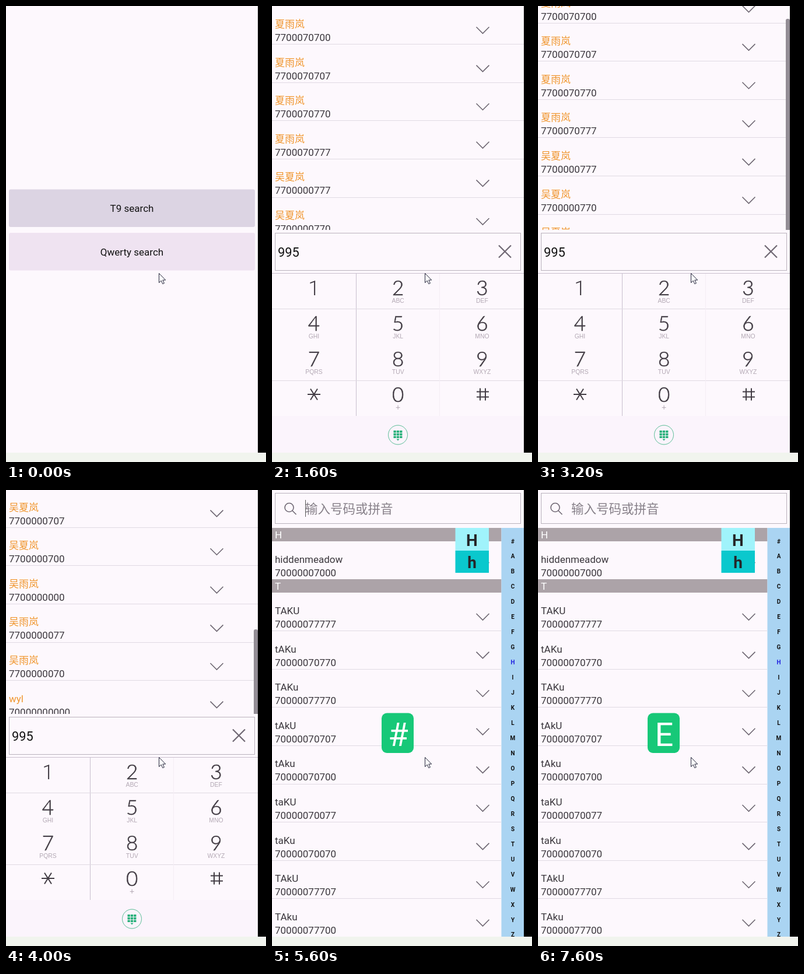
An HTML page for the animation above (8000 ms loop, 446 px wide and 782 px high).

```html
<!DOCTYPE html>
<html lang="zh-CN">
<head>
<meta charset="utf-8">
<title>Contact search</title>
<style>
html, body { margin: 0; width: 100%; height: 100%; overflow: hidden; background: #fdf8fd; }
svg { display: block; width: 446px; height: 782px; }
text { font-family: Roboto, "Noto Sans CJK SC", "Noto Sans CJK", sans-serif; font-size: 17px; fill: #3a363c; }
.mid { text-anchor: middle; }
.line { stroke: #e0dae3; fill: none; }
.icon { stroke: #6e6672; fill: none; stroke-width: 1.6; }
.hot { fill: #f0962e; }
.box { fill: #fdf8fd; stroke: #b9b2bc; }
.query { font-size: 21.8px; fill: #111; }
.digit { font: 300 35px Lato, sans-serif; fill: #423c44; stroke: #423c44; stroke-width: .6; }
.one { font-family: Roboto, sans-serif; stroke: none; }
.label { font: 10.4px "Liberation Sans", Arial, sans-serif; fill: #b3a8b4; }
.plus { font-size: 14px; }
.head { fill: #fff; }
.index { font-size: 10px; font-weight: 700; fill: #111; }
.tile { font-size: 28px; font-weight: 700; fill: #252528; }
.pop { font-size: 56px; fill: #fff; }
</style>
</head>
<body>
<svg viewBox="0 0 446 782">
  <defs>
    <clipPath id="top"><rect width="432" height="384"/></clipPath>
    <clipPath id="screen"><rect width="432" height="766"/></clipPath>
  </defs>
  <rect width="446" height="782" fill="#fdf8fd"/>
  <g id="menu">
    <rect id="btn0" x="5" y="314.5" width="422" height="64.5" rx="3"/>
    <rect id="btn1" x="5" y="389" width="422" height="64.5" rx="3"/>
    <text class="mid" x="216" y="353" style="fill:#111">T9 search</text>
    <text class="mid" x="216" y="427.5" style="fill:#111">Qwerty search</text>
  </g>
  <g id="dial">
    <g clip-path="url(#top)">
      <g id="list"></g>
      <rect id="thumb" x="425" width="7" height="400" rx="3" fill="#938d95"/>
    </g>
    <rect class="box" x="5.5" y="389.5" width="421" height="64"/>
    <text id="query" class="query" x="10" y="429.5"></text>
    <path id="erase" class="icon" style="stroke-width:2.2" d="M389 410.5l21 21m0-21l-21 21"/>
    <rect y="703" width="432" height="63" fill="#fbf4fc"/>
    <path stroke="#c9bfce" fill="none" d="M0 458.5H432M144.5 459V703"/>
    <path class="line" d="M0 519.5H432M0 642.5H432"/>
    <path stroke="#f4eef5" d="M287.5 459V703"/>
    <g id="keys"></g>
    <text class="label plus mid" x="216" y="693">+</text>
    <g stroke="#423c44" stroke-width="2" fill="none">
      <path d="M61 666H83M66 656.5L78 675.5M78 656.5L66 675.5"/>
      <path d="M357 655.5V676.5M366 655.5V676.5M351 661.5H372M351 670.5H372"/>
    </g>
    <circle cx="216" cy="735.5" r="16.5" fill="none" stroke="#58bd95"/>
    <g id="pad" fill="#27b07a"></g>
    <path d="M213.5 742.5h5l-2.5 3z" fill="#27b07a"/>
  </g>
  <g id="qwerty" clip-path="url(#screen)">
    <rect class="box" x="5.5" y="5.5" width="421" height="52"/>
    <path class="icon" d="M37 30a7.5 7.5 0 1 0-15 0a7.5 7.5 0 1 0 15 0M35 35.5l6.5 6.5"/>
    <text x="57" y="40" style="font-size:21.5px;fill:#878089">输入号码或拼音</text>
    <path id="caret" stroke="#555" d="M57.5 17V46"/>
    <g id="book"></g>
    <rect x="393.5" y="65" width="39" height="701" fill="#aad4f2"/>
    <g id="letters"></g>
    <rect x="314.5" y="65" width="57.5" height="39" fill="#a0f3fb"/>
    <rect x="314.5" y="104" width="57.5" height="38" fill="#0ac8cd"/>
    <text class="tile mid" x="343" y="95.5">H</text>
    <text class="tile mid" x="343" y="134">h</text>
    <rect x="188" y="382.5" width="55" height="68.5" rx="9" fill="#17c878"/>
    <text id="pop" class="pop mid" x="216.5" y="439"></text>
  </g>
  <rect x="432" width="14" height="766"/>
  <rect y="766" width="446" height="16" fill="#f1f4ee"/>
  <path d="M262.5 458.5v16l3.7-3.5 2.6 5.6 2.6-1.2-2.6-5.4h4.9z" fill="#fff" stroke="#23233a"/>
</svg>
<script>
const $ = id => document.getElementById(id);
const LOOP = 8000, STEP = 400, ROW = 65.6;
const text = (cls, x, y, s) => `<text class="${cls}" x="${x}" y="${y}">${s}</text>`;

function row(name, phone, top, hot, width) {
  const end = Math.floor(top + ROW) + 0.5;
  return `<text x="5" y="${top + 37}"><tspan class="hot">${name.slice(0, hot)}</tspan>${name.slice(hot)}</text>` +
    text("", 5, top + 60, phone) +
    `<path class="icon" d="M350.500 ${top + 36}l11 11 11-11"/>` +
    `<path class="line" d="M0 ${end}H${width}"/>`;
}

const people = (name, tails, lead = "770") => tails.split(" ").map(t => [name, lead + t]);
const latin = [
  ["hiddenmeadow", "70000007000"],
  ["TAKU", "70000077777"], ["tAKu", "70000070770"], ["TAKu", "70000077770"],
  ["tAkU", "70000070707"], ["tAku", "70000070700"], ["taKU", "70000070077"],
  ["taKu", "70000070070"], ["TAkU", "70000077707"], ["TAku", "70000077700"]
];
const full = people("夏雨岚", "0070700 0070707 0070770 0070777");
const one = [...people("夏岚", "0007777 0007707 0007770 0007700"), ...full];
const many = [
  ...full,
  ...people("吴夏岚", "0000777 0000770 0000707 0000700"),
  ...people("吴雨岚", "0000000 0000077 0000070"),
  ["wyl", "70000000000"], ["wYl", "70000000070"], ["wyL", "70000000007"]
];

// fixed parts
const labels = ["", "ABC", "DEF", "GHI", "JKL", "MNO", "PQRS", "TUV", "WXYZ", "", "", ""];
$("keys").innerHTML = labels.map((s, i) => {
  const x = 72 + (i % 3) * 144.2, y = 483.5 + Math.floor(i / 3) * 61;
  const d = [..."123456789 0 "][i];
  return text("digit mid" + (d === "1" ? " one" : ""), x, y + 12, d) + text("label mid", x, y + 25.5, s);
}).join("");

for (let i = 0; i < 9; i++) {
  $("pad").innerHTML += `<rect x="${208.5 + i % 3 * 5.3}" y="${728 + Math.floor(i / 3) * 4.7}" width="4.3" height="3.7" rx=".5"/>`;
}

const header = (y, s) => `<rect y="${y}" width="393.5" height="23" fill="#aca3a8"/>` + text("head", 5, y + 18, s);
$("book").innerHTML = latin.map(([n, p], i) =>
  row(n, p, i ? 176 + (i - 1) * ROW : 88, 0, 393)).join("") + header(65, "H") + header(153, "T");

$("letters").innerHTML = [..."#ABCDEFGHIJKLMNOPQRSTUVWXYZ"].map((c, i) =>
  `<text class="index mid" x="413" y="${91.5 + i * 25.96}"${c === "H" ? ' style="fill:#2020e0"' : ""}>${c}</text>`).join("");

const scrolls = [18, 36.5, 200, 395, 541.8, 541.8];

function draw(k) {
  const page = k === 0 || k === 13 ? "menu" : k < 13 ? "dial" : "qwerty";
  for (const id of ["menu", "dial", "qwerty"]) $(id).style.display = id === page ? "" : "none";
  if (page === "menu") {
    $("btn0").setAttribute("fill", k ? "#efe3f1" : "#dcd4e3");
    $("btn1").setAttribute("fill", k ? "#dcd4e3" : "#efe3f1");
  } else if (page === "dial") {
    const query = "995".slice(0, Math.min(k - 1, 3));
    const rows = [latin, one, many, many][query.length];
    const scroll = k < 7 ? 0 : scrolls[k - 7];
    $("list").innerHTML = rows.map(([n, p], i) => row(n, p, i * ROW - scroll, query.length, 432)).join("");
    $("query").textContent = query;
    $("erase").style.display = query ? "" : "none";
    $("thumb").style.display = scroll ? "" : "none";
    $("thumb").setAttribute("y", scroll * 0.605);
  } else {
    $("pop").textContent = "#ABCDE"[k - 14];
    $("caret").style.display = k === 17 || k === 19 ? "none" : "";
  }
}

let last = -1;
const start = performance.now();
function tick(now) {
  const k = Math.floor(Math.max(0, now - start) % LOOP / STEP);
  if (k !== last) draw(last = k);
  requestAnimationFrame(tick);
}
tick(start);
</script>
</body>
</html>
```
